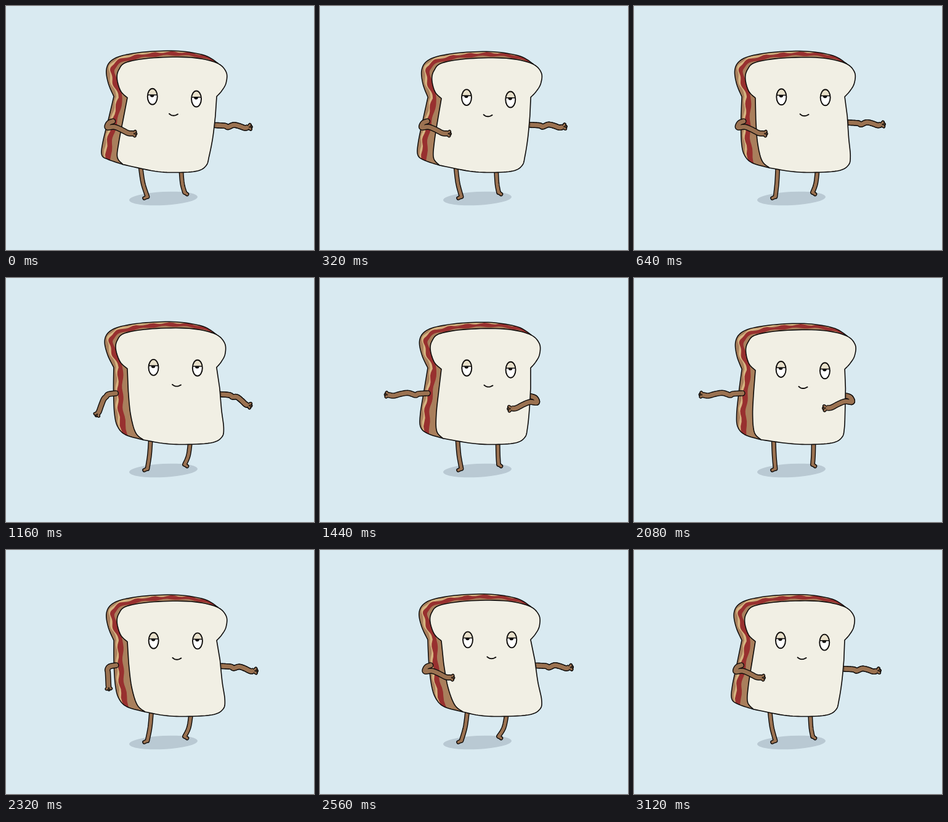
Recreate the animation shown at these times as an HTML page with a canvas. Size 500x398 px, loop 3200 ms.

```html
<!DOCTYPE html>
<html lang="en">
<head>
<meta charset="utf-8">
<title>Dancing sandwich</title>
<style>
  html, body { margin: 0; width: 100%; height: 100%; overflow: hidden; background: #d9eaf1; }
  canvas { display: block; width: 500px; height: 398px; }
</style>
</head>
<body>
<canvas id="stage" width="500" height="398"></canvas>
<script>
const ctx = document.getElementById('stage').getContext('2d');
const LOOP = 3200, SWAY = 1600;
const INK = '#0d0b0a', BREAD = '#f1efe4', CRUST = '#a97f5c', LIMB = '#9b7251',
      BACON = '#98302f', FAT = '#d6b480', LID = '#e8e0ca', SHADOW = '#b9c9d3', BACK = '#d9eaf1';

const lerp = (a, b, p) => a + (b - a) * p;
const clamp = p => Math.max(0, Math.min(1, p));
const ease = p => clamp(p) ** 2 * (3 - 2 * clamp(p));
const swing = (time, peak) => Math.cos((time - peak) / SWAY * 2 * Math.PI);
const along = ([x, y], angle, d) => [x + Math.cos(angle) * d, y + Math.sin(angle) * d];

// Dense points along a smooth curve
function smooth(pts, steps = 8) {
  const at = i => pts[Math.max(0, Math.min(pts.length - 1, i))];
  const out = [pts[0]];
  for (let i = 0; i < pts.length - 1; i++) {
    const [a, b, c, d] = [at(i - 1), at(i), at(i + 1), at(i + 2)];
    for (let s = 1; s <= steps; s++) {
      const t = s / steps;
      out.push([0, 1].map(k => b[k] + 0.5 * t * (c[k] - a[k]
        + t * (2 * a[k] - 5 * b[k] + 4 * c[k] - d[k]
        + t * (3 * (b[k] - c[k]) + d[k] - a[k])))));
    }
  }
  return out;
}

function trace(pts) {
  ctx.beginPath();
  pts.forEach(p => ctx.lineTo(p[0], p[1]));
}

function fill(pts, color) {
  trace(pts);
  ctx.fillStyle = color;
  ctx.fill();
}

function line(pts, color, width, cap = 'round') {
  trace(pts);
  ctx.strokeStyle = color;
  ctx.lineWidth = width;
  ctx.lineCap = cap;
  ctx.lineJoin = 'round';
  ctx.stroke();
}

// Curve shifted along its normal by depth(progress) plus a wave
function wavy(pts, depth, height, length, phase) {
  const last = pts.length - 1;
  let run = 0;
  return pts.map((p, i) => {
    const a = pts[Math.max(0, i - 1)], b = pts[Math.min(last, i + 1)];
    const dx = b[0] - a[0], dy = b[1] - a[1], len = Math.hypot(dx, dy);
    run += Math.hypot(p[0] - a[0], p[1] - a[1]);
    const d = depth(i / last) + height * Math.sin(run / length * 2 * Math.PI + phase);
    return [p[0] + dy / len * d, p[1] - dx / len * d];
  });
}

function ribbon(edge, shift, width, phase, color) {
  const middle = p => 1 + 10 * clamp(p * 1.8) + shift;
  const half = p => width * lerp(0.6, 1.2, p);
  fill([
    ...wavy(edge, p => middle(p) - half(p), 1.3, 29, phase),
    ...wavy(edge, p => middle(p) + half(p), 1.1, 37, phase + 2).reverse()
  ], color);
}

// Shoulder to elbow, then a wavy forearm that swings from outward to inward
function armPoints([x, y], side, reach, bend) {
  const elbow = [lerp(20, 9, bend), lerp(3, 10, bend)];
  const angle = lerp(-0.05, 2.95, bend);
  const length = lerp(reach, 49, bend) - 19 * Math.abs(Math.sin(angle));
  const pts = [[0, 0], [elbow[0] * 0.75, elbow[1] * 0.3], elbow];
  for (let k = 0.25; k <= 1; k += 0.25) {
    const [px, py] = along(elbow, angle, length * k);
    pts.push([px, py - 3 * Math.sin(k * 5.7)]);
  }
  return pts.map(p => [x + side * p[0], y + p[1]]);
}

function arm(pts, cap) {
  const [before, tip] = pts.slice(-2);
  const dir = Math.atan2(tip[1] - before[1], tip[0] - before[0]);
  const wrist = along(tip, dir, -4);
  const curve = smooth([...pts.slice(0, -1), wrist]);
  const fingers = [-0.7, 0, 0.7].map(a => [wrist, along(wrist, dir + a, 5.5)]);
  line(curve, INK, 9.6, cap);
  fingers.forEach(f => line(f, INK, 5.6));
  line(curve, LIMB, 6.8, cap);
  fingers.forEach(f => line(f, LIMB, 2.8));
  for (const a of [-0.4, 0.4]) line([along(tip, dir + a, -2), along(tip, dir + a, 2.5)], INK, 1);
}

function leg(hip, ankle, toe) {
  const pts = smooth([[hip, 264], [lerp(hip, ankle[0], 0.35), 289], ankle]);
  line(pts, INK, 7.8);
  line([ankle, toe], INK, 6.6);
  line(pts, LIMB, 5);
  line([ankle, toe], LIMB, 3.8);
}

function eye(x, y) {
  const oval = () => {
    ctx.beginPath();
    ctx.ellipse(x, y, 8, 13, 0, 0, 7);
  };
  ctx.save();
  oval();
  ctx.clip();
  ctx.fillStyle = '#fff';
  ctx.fill();
  ctx.fillStyle = LID;
  ctx.fillRect(x - 9, y - 14, 18, 11);
  ctx.beginPath();
  ctx.arc(x - 0.5, y - 2.5, 3.4, 0, Math.PI);
  ctx.fillStyle = INK;
  ctx.fill();
  line([[x - 9, y - 2.8], [x + 9, y - 2.8]], INK, 1.5);
  ctx.restore();
  oval();
  ctx.strokeStyle = INK;
  ctx.lineWidth = 1.9;
  ctx.stroke();
}

function draw(time) {
  const sway = swing(time, 920), bob = swing(time, 360);
  const h = 2 + 16 * sway, lift = Math.min(h, 0) * 0.45;

  // The crown drifts with the bob, the sides lean with the hips
  const crown = pts => pts.map(([x, y]) =>
    [x + 2.6 * bob * clamp((150 - y) / 50), y + 0.3 + 1.5 * bob]);
  const lean = (x, amount, y) => [x + amount * h, y];
  const corner = lean(207, 1.4, 264 + lift);

  // The straightening arm leads, the bending one follows
  const moved = start => ease((time - start) / 240);
  const leftBend = 1 - moved(1020) + moved(2190);
  const rightBend = moved(1100) - moved(2110);
  const left = armPoints(lean(176, 0.2, 188), -1, 48, leftBend);
  const right = armPoints(lean(345, 0.38, 192 - 0.2 * h), 1, 37, rightBend);

  ctx.fillStyle = BACK;
  ctx.fillRect(0, 0, 500, 398);
  ctx.beginPath();
  ctx.ellipse(255.5, 314, 55.5, 11, -0.05, 0, 7);
  ctx.fillStyle = SHADOW;
  ctx.fill();
  leg(227 + 0.68 * h, [229.5, 311], [224.5, 313.5]);
  leg(292 + 0.65 * h, [290, 304], [294, 307]);
  arm([[right[0][0] - 8, right[0][1] - 1], ...right], 'butt');

  const backTop = smooth(crown([[344, 93], [322, 80], [280, 73], [230, 74], [190, 80],
    [170, 89], [162.5, 104], [166, 126], [175, 147]]));
  const waist = [backTop[backTop.length - 1], lean(170.5, 0.35, 185), lean(167, 0.8, 222)];
  const back = [...backTop, ...smooth([...waist, lean(169, 1.1, 243),
    lean(181, 1.2, 256 + lift), corner])];
  const edge = [...backTop, ...smooth([...waist, lean(170, 1.3, 272)])];

  fill(back, CRUST);
  ctx.save();
  trace(back);
  ctx.clip();
  ribbon(edge, -4, 2.4, 1, FAT);
  ribbon(edge, 0, 3.6, 0, BACON);
  ctx.restore();
  line(back, INK, 1.5);

  const front = [
    ...smooth(crown([[197, 149], [186, 138], [180, 118], [183, 103], [196, 91], [240, 84],
      [300, 83.5], [341, 92], [357, 107], [357, 125], [350, 138], [342, 147]])),
    ...smooth([lean(343.5, 0.3, 180), lean(343, 0.6, 215), lean(342, 1, 245),
      lean(338, 1.05, 260), lean(322, 0.9, 269), lean(282, 0.3, 271.5),
      lean(248, 0.5, 269.5), corner]),
    ...smooth([corner, lean(196, 1.25, 252 + lift), lean(193, 0.8, 222), lean(194.5, 0.35, 185)])
  ];
  front.push(front[0]);
  fill(front, BREAD);
  line(front, INK, 1.6);

  const eyeX = 238.8 + 1.2 * sway, eyeY = 147.5 + 1.6 * bob;
  eye(eyeX, eyeY);
  eye(eyeX + 71.3, eyeY + 2 - 2 * sway);
  const mouthX = 275 + 3.4 * sway, mouthY = 177 + 1.8 * bob;
  line(smooth([[-7, -1.5], [-3, 1], [2, 1.3], [7, -0.8]]
    .map(([x, y]) => [mouthX + x, mouthY + y])), INK, 1.9);

  arm(left, 'round');
  arm(right, 'butt');
}

function tick(now) {
  const t = now % LOOP, step = t < 2560 ? 40 : 80;
  draw(Math.floor(t / step) * step);
  requestAnimationFrame(tick);
}
draw(0);
requestAnimationFrame(tick);
</script>
</body>
</html>
```
